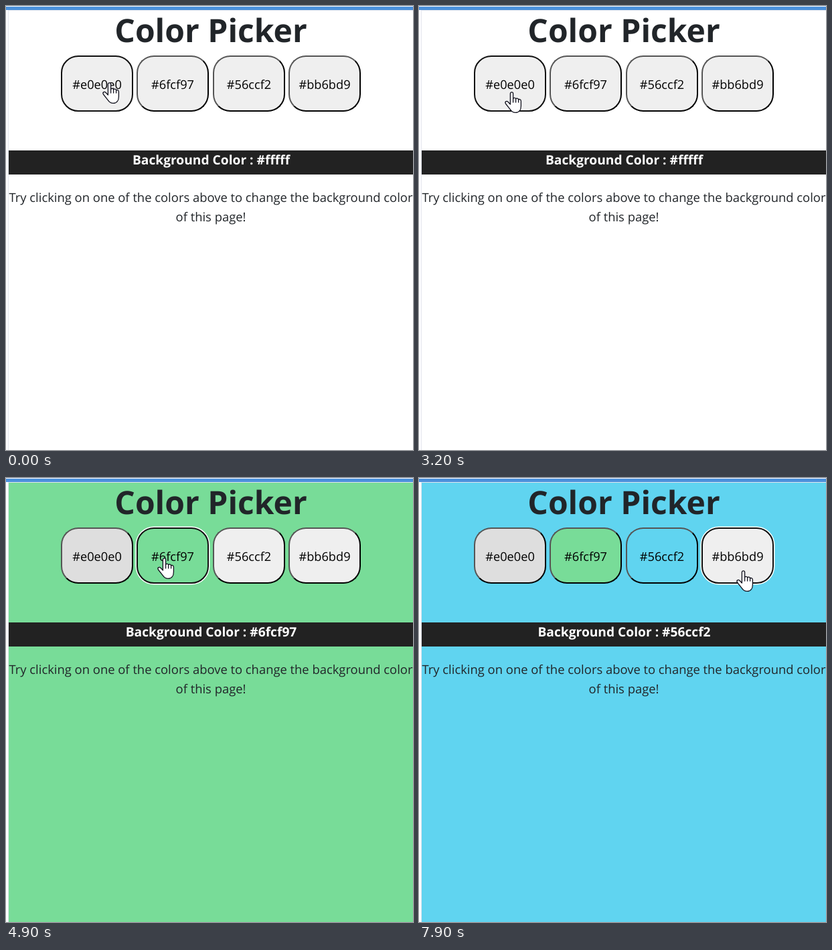
Write an HTML page that moves like this. It is 608 px wide and 664 px high and loops after 8 s.

```html
<!DOCTYPE html>
<html lang="en">
<head>
<meta charset="utf-8">
<title>Color Picker</title>
<style>
  html, body { margin: 0; width: 100%; height: 100%; overflow: hidden; background: #fff; }
  #stage { position: relative; width: 608px; height: 664px; overflow: hidden; background: #fdfdff; }
  #stage > * { position: absolute; box-sizing: border-box; }
  #strip { left: 0; top: 1px; width: 608px; height: 5px; background: #4a90dc; }
  #page { left: 3px; top: 6px; width: 605px; height: 658px; border: solid #e4e6ee; border-width: 1px 0 0 1px; }
  #bar { left: 4px; top: 216px; width: 604px; height: 36px; background: #222; }
  .pick { top: 74px; width: 108px; height: 84px; border: 2px solid; border-color: #555 #000 #000 #555; border-radius: 26px; }
  .pick.focus { border-color: #101010; box-shadow: 0 0 0 1.5px #fff; }
  svg { left: 0; top: 0; }
  text { font-family: "Open Sans", "Noto Sans", sans-serif; text-anchor: middle; text-rendering: geometricPrecision; }
  .title { font-size: 48px; font-weight: 700; fill: #212529; }
  .label { font-size: 19.2px; font-weight: 700; fill: #fff; }
  .body { font-size: 18.4px; fill: #212529; }
  .code { font-size: 18.2px; fill: #000; }
</style>
</head>
<body>
<div id="stage">
  <div id="strip"></div>
  <div id="page"></div>
  <div id="bar"></div>
  <svg id="art" width="608" height="664">
    <text class="title" x="306" y="54">Color Picker</text>
    <text class="label" id="label" x="306.5" y="237"></text>
    <text class="body" x="306" y="293">Try clicking on one of the colors above to change the background color</text>
    <text class="body" x="306" y="322">of this page!</text>
    <g id="hand" stroke="#10101c" stroke-width="1.3" stroke-linejoin="round" stroke-linecap="round">
      <path fill="#fff" d="M8.4 19V3a2.1 2.1 0 0 1 4.2 0V10.5C13 8.8 16.4 8.8 16.6 11C17.2 9.6 20.4 9.9 20.6 12.2C21.2 11 24.4 11.4 24.4 14.2V21.5C24.4 27 21.6 31.4 16.2 31.4C12.4 31.4 10 29.4 8.2 26.6L1.4 18C-0.2 15.4 2.8 13.2 4.8 15.2Z"/>
      <path fill="none" d="M12.6 10.5V16M16.6 11V16M20.6 12.2V16"/>
    </g>
  </svg>
</div>
<script>
const LOOP = 8000, STEP = 100;
const picks = [
  { code: "#e0e0e0", x: 82, fill: "#dedede", page: "#dfdfdf", focus: 0, click: 3400 },
  { code: "#6fcf97", x: 195, fill: "#78dc98", page: "#78dc98", focus: 4700, click: 4800 },
  { code: "#56ccf2", x: 309, fill: "#60d4f0", page: "#60d4f0", focus: 6400, click: 6500 },
  { code: "#bb6bd9", x: 422, fill: "#c67fe0", page: "#c67fe0", focus: 7900, click: Infinity }
];
// time, x, y of the pointer
const path = [
  [0, 144, 114], [2300, 144, 114], [2900, 128, 128], [4000, 128, 128],
  [4600, 226, 119], [5500, 226, 119], [6200, 345, 122], [7000, 345, 122],
  [7700, 474, 138], [LOOP, 474, 138]
];
const $ = id => document.getElementById(id);

for (const p of picks) {
  p.el = document.createElement("div");
  p.el.className = "pick";
  p.el.style.left = p.x + "px";
  $("stage").insertBefore(p.el, $("art"));
  const text = document.createElementNS("http://www.w3.org/2000/svg", "text");
  text.setAttribute("class", "code");
  text.setAttribute("x", p.x + 54);
  text.setAttribute("y", 124);
  text.textContent = p.code;
  $("art").insertBefore(text, $("hand"));
}

function pointer(t) {
  const i = path.findIndex(k => k[0] > t);
  const [t0, x0, y0] = path[i - 1], [t1, x1, y1] = path[i];
  const u = (t - t0) / (t1 - t0), e = u * u * (3 - 2 * u);
  return [x0 + (x1 - x0) * e, y0 + (y1 - y0) * e].map(Math.round);
}

function draw(now) {
  const t = Math.floor((now % LOOP) / STEP) * STEP;
  const focused = picks.filter(p => t >= p.focus).pop();
  const chosen = picks.filter(p => t >= p.click).pop();
  for (const p of picks) {
    p.el.classList.toggle("focus", p === focused);
    p.el.style.background = t >= p.click ? p.fill : "#efefef";
  }
  $("page").style.background = chosen ? chosen.page : "#fff";
  $("label").textContent = "Background Color : " + (chosen ? chosen.code : "#fffff");
  $("hand").setAttribute("transform", `translate(${pointer(t)})`);
}

const start = performance.now();
function tick() {
  draw(performance.now() - start);
  requestAnimationFrame(tick);
}
tick();
</script>
</body>
</html>
```
